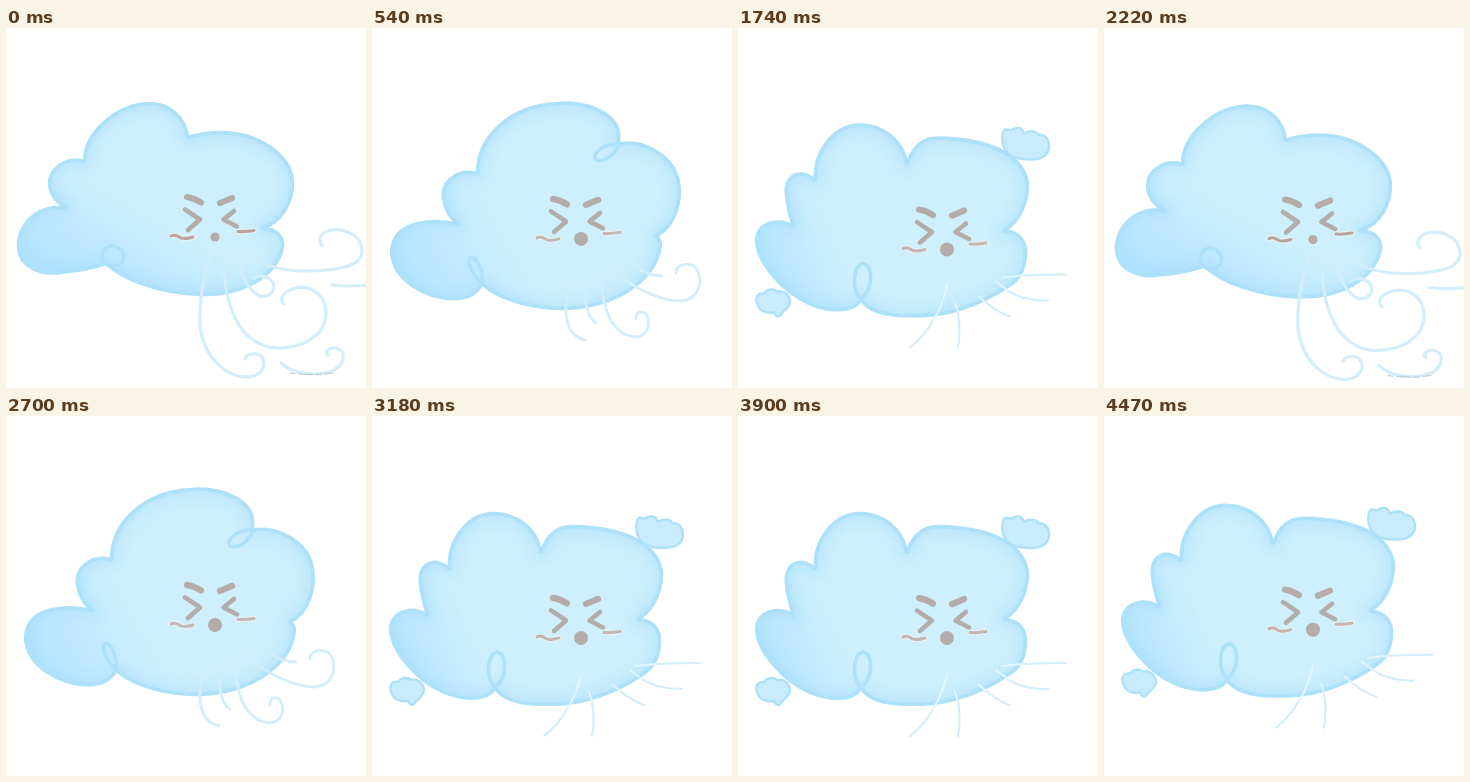
Write an HTML page that moves like this. It is 360 by 360 pixels and loops after 4500 ms.

```html
<!DOCTYPE html>
<html>
<head>
<meta charset="utf-8">
<title>Blowing cloud</title>
<style>
html, body { margin: 0; width: 100%; height: 100%; overflow: hidden; background: #fff; }
svg { display: block; width: 100%; height: 100%; }
path { fill: none; stroke-linecap: round; stroke-linejoin: round; }
.rim { stroke: #ade1f9; stroke-width: 2.4; }
.edge { stroke: #ade1f9; stroke-width: 5; }
.curl { stroke: #ade1f9; stroke-width: 3.6; }
.puff { fill: #c8ebfd; stroke: #ade1f9; stroke-width: 2.4; }
.glow { stroke: #a5dcfa; stroke-width: 15; opacity: .45; filter: url(#soft); }
.wind { stroke: #d3eefa; }
.haze { stroke: #e2f6ff; }
.face path { stroke: #b3aca8; stroke-width: 4.6; }
.face .brow { stroke-width: 6.2; }
.face .halo { stroke: #e4f2f7; stroke-width: 5.5; }
.face .cheek { stroke: #bfb3ad; stroke-width: 3; }
</style>
</head>
<body>
<svg id="stage" viewBox="0 0 360 360">
  <defs>
    <filter id="soft" x="-20%" y="-20%" width="140%" height="140%"><feGaussianBlur stdDeviation="6"/></filter>
  </defs>
</svg>
<script>
const LOOP = 4500, STEP = 30, CYCLE = 712.5, BOB = 10;

// Each pose is drawn where it sits when the bob equals `rest`.
const poses = [
  {
    rest: -10, mouth: 209, r: 4.6, width: 3.2, shade: [60, 245, 105, 165], cheek: '#b9a49a',
    body: 'M60 180C35 174 10 195 12 220C14 240 35 248 55 245C75 243 90 240 100 236C115 250 150 266 195 267C235 268 270 250 277 220C279 208 270 200 257 200C275 195 288 175 287 152C284 125 250 104 215 104C203 104 192 106 182 109C180 90 165 75 143 75C110 76 78 105 78 133C60 128 42 140 43 157C44 168 52 176 60 180Z',
    curls: ['M98 236C92 225 100 217 108 218C118 220 120 230 115 235C110 240 100 238 97 233'],
    wind: [
      'M207 222C198 245 193 270 194 298C198 330 220 350 243 349C256 347 260 338 257 331C253 323 241 325 239 331',
      'M219 224C216 260 225 318 272 320C300 320 321 305 320 283C318 262 300 258 290 260C277 263 272 272 278 276',
      'M228 224C236 245 240 262 254 268C264 270 270 262 267 255C263 247 252 247 248 250',
      'M233 222C250 235 275 244 305 243C335 242 357 238 356 222C355 205 335 199 322 203C313 207 312 213 316 217',
      'M275 335C285 345 310 350 328 342C340 335 340 322 330 320C322 319 318 324 322 327',
      'M326 257Q342 259 360 257'
    ],
    haze: [],
    specks: 'M284 345Q305 348 327 345'
  },
  {
    rest: 9.8, mouth: 222, r: 7, width: 2.1, shade: [20, 240, 95, 205], cheek: '#c2b6af',
    body: 'M55 199C45 190 20 192 18 212C18 235 45 265 70 276C90 285 115 286 123 273C135 290 165 290 195 288C225 285 255 270 272 258C282 252 287 243 288 228C289 214 282 204 267 203C283 194 291 172 290 155C284 125 250 111 200 110C185 110 175 118 169 135C165 113 145 96 120 97C95 98 75 125 77 152C60 138 45 150 48 168C49 182 53 192 55 199Z',
    curls: ['M123 271C114 265 114 238 125 236C136 238 135 262 123 271'],
    puffs: [
      'M269 125C262 116 264 104 267 102C270 101 272 104 274 102C280 99 284 100 286 106C292 102 299 104 300 107C312 107 314 121 307 128C300 134 275 133 269 125Z',
      'M20 278C16 270 20 265 26 266C30 260 38 262 39 264C46 262 52 268 52 275C50 282 44 284 42 288C40 290 37 288 36 285C30 286 22 284 20 278Z'
    ],
    wind: [
      'M284 248Q305 247 328 247', 'M270 263C280 270 295 273 310 273', 'M248 275Q260 285 272 289',
      'M220 285Q223 305 220 320', 'M172 320Q187 308 195 293'
    ],
    haze: ['M209 258Q204 280 195 293', 'M217 276L220 285', 'M241 269L248 275', 'M258 254L270 263', 'M264 250L284 248']
  },
  {
    rest: 0, mouth: 212, r: 7, width: 2.6, shade: [20, 235, 100, 195], cheek: '#bdb4b0',
    body: 'M72 196C45 186 3 192 3 225C5 252 48 275 84 270C98 269 108 264 112 259C132 276 165 283 198 282C245 279 284 254 288 222C288 212 283 207 277 206C298 196 304 170 300 152C293 126 260 110 226 114C228 92 195 80 165 82C125 84 94 112 95 148C76 141 60 155 62 172C63 184 67 191 72 196Z',
    curls: ['M112 259C116 242 108 228 101 231C97 239 104 251 112 259', 'M227 112C226 125 214 134 206 131C203 125 211 116 224 114'],
    wind: [
      'M200 262Q193 282 199 300', 'M214 260Q214 285 224 298', 'M230 256Q236 285 258 297', 'M246 250Q270 271 304 269', 'M264 243Q280 249 300 247'
    ],
    haze: []
  },
  {
    rest: -2.4, mouth: 209, r: 7, width: 2.8, shade: [20, 235, 120, 180], cheek: '#c2b8b3',
    body: 'M86 194C60 188 20 190 19 222C20 250 55 272 88 269C100 268 108 260 110 255C130 272 165 280 195 279C245 277 285 250 289 215C289 210 286 206 285 206C305 195 310 170 307 152C302 125 270 108 246 114C255 85 215 70 185 73C140 75 105 105 105 143C85 138 68 152 71 170C74 182 78 190 86 194Z',
    curls: ['M247 112C245 125 232 133 224 130C220 125 228 116 242 114', 'M110 255C112 240 104 225 98 228C95 235 102 245 108 252'],
    wind: [
      'M198 255C192 275 190 305 213 310', 'M213 250C212 270 215 288 224 293',
      'M228 243C230 270 235 303 262 307C275 307 280 295 274 284C269 280 264 282 264 289',
      'M240 235C250 255 290 272 310 271C330 268 332 245 322 236C312 232 303 237 304 243',
      'M262 235Q274 246 290 246'
    ],
    haze: []
  }
];

const stage = document.getElementById('stage');

function add(parent, tag, attrs) {
  const el = document.createElementNS('http://www.w3.org/2000/svg', tag);
  for (const key in attrs) el.setAttribute(key, attrs[key]);
  parent.appendChild(el);
  return el;
}

const line = (parent, d, cls, extra) => add(parent, 'path', { d, class: cls, ...extra });

function drawFace(parent, pose) {
  const face = add(parent, 'g', { class: 'face', transform: `translate(0 ${pose.mouth - 209})` });
  line(face, 'M181 169Q188 170 195 174.5', 'brow');
  line(face, 'M214 175L226 170', 'brow');
  line(face, 'M179 181.5L194 191.5L182 202', '');
  line(face, 'M228 183L217.5 191.5L231 198.5', '');
  for (const d of ['M165 208Q169 206 173 209T187 209', 'M232 203.5Q240 204 248 202.5']) {
    line(face, d, 'halo');
    line(face, d, 'cheek', { style: 'stroke:' + pose.cheek });
  }
  add(face, 'circle', { cx: 209, cy: 209, r: pose.r, fill: '#b3aca8' });
}

function drawPose(pose, i) {
  const g = add(stage, 'g', {});
  const defs = add(g, 'defs', {});
  const [x1, y1, x2, y2] = pose.shade;
  const grad = add(defs, 'linearGradient', { id: 'fill' + i, gradientUnits: 'userSpaceOnUse', x1, y1, x2, y2 });
  add(grad, 'stop', { offset: 0, 'stop-color': '#b3e4fe' });
  add(grad, 'stop', { offset: 1, 'stop-color': '#cdeffe' });
  add(add(defs, 'clipPath', { id: 'clip' + i }), 'path', { d: pose.body });

  line(g, pose.body, 'rim', { style: `fill:url(#fill${i})` });
  const inside = add(g, 'g', { 'clip-path': `url(#clip${i})` });
  line(inside, pose.body, 'glow');
  line(inside, pose.body, 'edge');
  pose.curls.forEach(d => line(g, d, 'curl'));
  (pose.puffs || []).forEach(d => line(g, d, 'puff'));
  pose.wind.forEach(d => line(g, d, 'wind', { 'stroke-width': pose.width }));
  pose.haze.forEach(d => line(g, d, 'haze', { 'stroke-width': 2 }));
  if (pose.specks) line(g, pose.specks, '', { stroke: '#b9c8ce', 'stroke-width': 1, 'stroke-dasharray': '5 4 14 3' });
  drawFace(g, pose);
  return g;
}

const groups = poses.map(drawPose);

function render(now) {
  const time = Math.floor((now % LOOP) / STEP) * STEP;
  const phase = (time / CYCLE) % 1;
  const current = Math.floor(phase * poses.length);
  const bob = -BOB * Math.cos(phase * 2 * Math.PI);
  groups.forEach((g, i) => { g.style.display = i === current ? '' : 'none'; });
  groups[current].setAttribute('transform', `translate(0 ${(bob - poses[current].rest).toFixed(2)})`);
}

const start = performance.now();
function tick() {
  render(performance.now() - start);
  requestAnimationFrame(tick);
}
tick();
</script>
</body>
</html>
```
